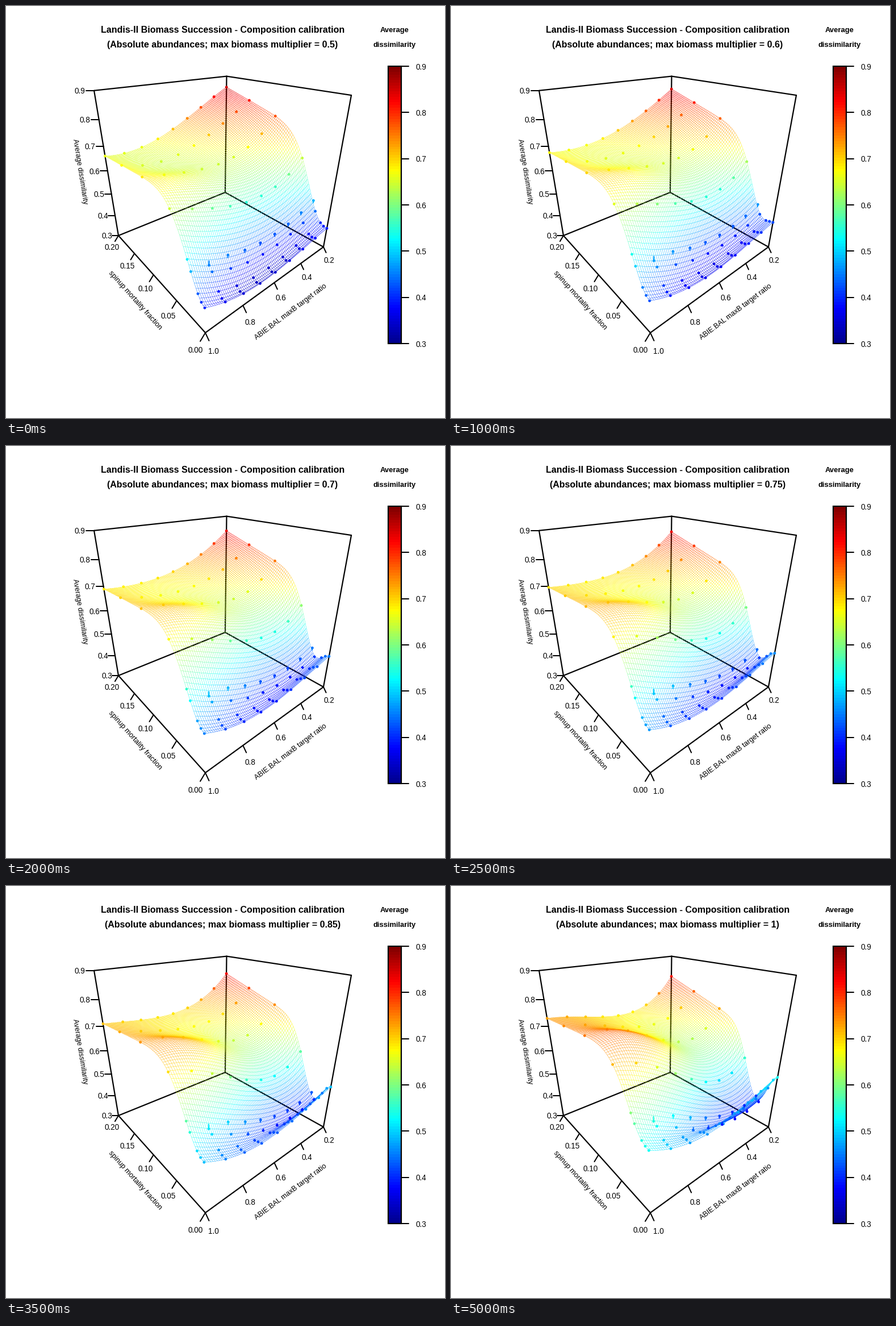
Write a matplotlib script that moves like this. It is 773 px wide and 725 px high and loops after 5.5 s.

```python
import numpy as np
import matplotlib.pyplot as plt
from matplotlib.animation import FuncAnimation
from matplotlib.collections import LineCollection
from matplotlib.colors import ListedColormap
from matplotlib.patches import Rectangle

W, H, DPI = 773, 725, 100
FRAMES, STEP_MS = 11, 500
PT = 72 / DPI  # points per pixel

plt.rcParams["font.family"] = "Liberation Sans"

# Perspective of the unit box: u = target ratio 1.0 -> 0.2,
# v = mortality 0 -> 0.2, w = dissimilarity 0.3 -> 0.9.
CAMERA = np.array([
    [433.4, -58.5, -108.7, 351.0],
    [20.0, 21.9, -420.5, 575.0],
    [0.4033, 0.4775, -0.292, 1.0],
])

DOT_U = np.linspace(0, 1, 9)[None, :]
DOT_V = np.array([0, 0.005, 0.01, 0.02, 0.025, 0.05, 0.1, 0.15, 0.2])[:, None] / 0.2
MESH_U = np.linspace(1, 0, 80)[None, :]
MESH_V = np.linspace(1, 0, 80)[:, None]


def jet(n=100):
    x = np.linspace(0, 1, n)
    stops = [0, 0.125, 0.375, 0.625, 0.875, 1]
    red = np.interp(x, stops, [0, 0, 0, 1, 1, 0.5])
    green = np.interp(x, stops, [0, 0, 1, 1, 0, 0])
    blue = np.interp(x, stops, [0.56, 1, 1, 0, 0, 0])
    return ListedColormap(np.column_stack([red, green, blue]))


CMAP = jet()


def project(u, v, w):
    u, v, w = np.broadcast_arrays(u, v, w)
    x, y, d = np.tensordot(CAMERA, np.stack([u, v, w, np.ones(u.shape)]), 1)
    return np.stack([x / d, y / d], axis=-1)


def depth(u, v, w):
    return CAMERA[2] @ [u, v, w, 1]


def mix(a, b, t):
    return a + (b - a) * t


def rise(v, scale, power):
    return 1 - np.exp(-(v / scale) ** power)


def surface(t, u, v):
    """Height over the grid: two edge profiles with a sagging span between."""
    lip = np.exp(-(v / 0.075) ** 2)
    left = (mix(0.165, 0.325, t) + 0.06 * t * lip
            + rise(v, 0.185, 1.8) * (mix(0.465, 0.42, t) + 0.08 * (0.65 - v)))
    right = (mix(0.12, 0.09, t) + mix(0.03, 0.29, t) * lip
             + rise(v, mix(0.22, 0.255, t), 2 + t)
             * (mix(0.55, 0.47, t) + mix(0.25, 0.29, t) * v))
    sag = mix(0.32 + 0.28 * np.sin(np.pi * v ** 0.6), 0.43 + 0.17 * v, t)
    skew = (1.2 * np.exp(-((v - 0.38) / 0.2) ** 2) - 0.4
            + 1.2 * t * np.tanh(4 * v))
    return mix(left, right, u) - u * (1 - u) * (sag + skew * (u - 0.5))


def residuals(t):
    r = np.zeros((9, 9))
    r[4, 1] = -0.03
    r[4, 2:] = 0.02
    r[3, 3:] = -0.02 * t
    return r


def mesh(t):
    w = surface(t, MESH_U, MESH_V)
    p = project(MESH_U, MESH_V, w)
    along = np.stack([p[:, :-1], p[:, 1:]], axis=2).reshape(-1, 2, 2)
    across = np.stack([p[:-1], p[1:]], axis=2).reshape(-1, 2, 2)
    level = np.concatenate([((w[:, :-1] + w[:, 1:]) / 2).ravel(),
                            ((w[:-1] + w[1:]) / 2).ravel()])
    return np.concatenate([along, across]), CMAP(level)


def dots(t):
    fit = surface(t, DOT_U, DOT_V)
    w = fit + residuals(t)
    top = project(DOT_U, DOT_V, w).reshape(-1, 2)
    foot = project(DOT_U, DOT_V, fit).reshape(-1, 2)
    return top, np.stack([top, foot], axis=1), CMAP(w.ravel())


fig = plt.figure(figsize=(W / DPI, H / DPI), dpi=DPI, facecolor="white")
ax = fig.add_axes([0, 0, 1, 1])


def line(p, q, width=2.0):
    ax.plot([p[0], q[0]], [p[1], q[1]], color="black", lw=width * PT,
            solid_capstyle="round", zorder=1)


def label(x, y, s, size=13.5, **kw):
    kw = {"ha": "center", "va": "center_baseline", **kw}
    return ax.text(x, y, s, fontsize=size * PT, color="black", **kw)


def tick(pos, text, mark, place):
    p = project(*pos)
    scale = 1 / depth(*pos)
    line(p, p + np.array(mark) * scale)
    x, y = p + np.array(place) * scale
    label(x, y, text)


def draw_box():
    edges = [((0, 0, 0), (0, 1, 0)), ((0, 0, 0), (1, 0, 0)),
             ((0, 1, 0), (1, 1, 0)), ((1, 0, 0), (1, 1, 0)),
             ((0, 1, 0), (0, 1, 1)), ((1, 0, 0), (1, 0, 1)),
             ((1, 1, 0), (1, 1, 1)), ((0, 1, 1), (1, 1, 1)),
             ((1, 0, 1), (1, 1, 1))]
    for a, b in edges:
        line(project(*a), project(*b), 2.2)
    for i in range(7):
        tick((0, 1, i / 6), f"{0.3 + i / 10:.1f}", (-16.5, 0), (-30, 0))
    for i in range(5):
        tick((i / 4, 0, 0), f"{1 - i / 5:.1f}", (6.5, 14), (14, 31))
        tick((0, i / 4, 0), f"{i / 20:.2f}", (-9, 15), (-17, 29))
    for x, y, s, angle in [(227, 518, "spinup mortality fraction", -48.2),
                           (501, 538, "ABIE.BAL maxB target ratio", 37),
                           (130, 291, "Average dissimilarity", -81)]:
        label(x, y, s, 12.6, rotation=angle, va="center",
              rotation_mode="anchor")


def draw_colorbar():
    left, right, top, bottom = 672.5, 696, 106, 594
    ax.imshow(np.linspace(1, 0, 100)[:, None], cmap=CMAP, aspect="auto",
              extent=(left, right, bottom, top), interpolation="nearest")
    ax.add_patch(Rectangle((left, top), right - left, bottom - top,
                           fill=False, ec="black", lw=2.2 * PT, zorder=3))
    for i in range(7):
        y = bottom + (top - bottom) * i / 6
        line((right, y), (709, y))
        label(730.5, y, f"{0.3 + i / 10:.1f}")
    label(684, 41, "Average", 13, weight="bold")
    label(684, 67, "dissimilarity", 13, weight="bold")


draw_box()
draw_colorbar()
label(382, 41, "Landis-II Biomass Succession - Composition calibration",
      16, weight="bold")
subtitle = label(381.5, 67, "", 16, weight="bold")

wires = LineCollection([], linewidths=0.45 * PT, zorder=4)
drops = LineCollection([], linewidths=2 * PT, zorder=5)
ax.add_collection(wires, autolim=False)
ax.add_collection(drops, autolim=False)
points = ax.scatter(np.zeros(81), np.zeros(81), s=(4.8 * PT) ** 2,
                    linewidths=0, zorder=6)

ax.set_xlim(0, W)
ax.set_ylim(H, 0)
ax.axis("off")


def update(i):
    t = i / (FRAMES - 1)
    segments, colors = mesh(t)
    wires.set_segments(segments)
    wires.set_color(colors)
    top, stems, colors = dots(t)
    drops.set_segments(stems)
    drops.set_color(colors)
    points.set_offsets(top)
    points.set_facecolor(colors)
    multiplier = round(0.5 + 0.05 * i, 2)
    subtitle.set_text("(Absolute abundances; max biomass multiplier = "
                      f"{multiplier:g})")
    return wires, drops, points, subtitle


anim = FuncAnimation(fig, update, frames=FRAMES, interval=STEP_MS,
                     init_func=lambda: update(0), repeat=True, repeat_delay=0)
plt.show()
```
